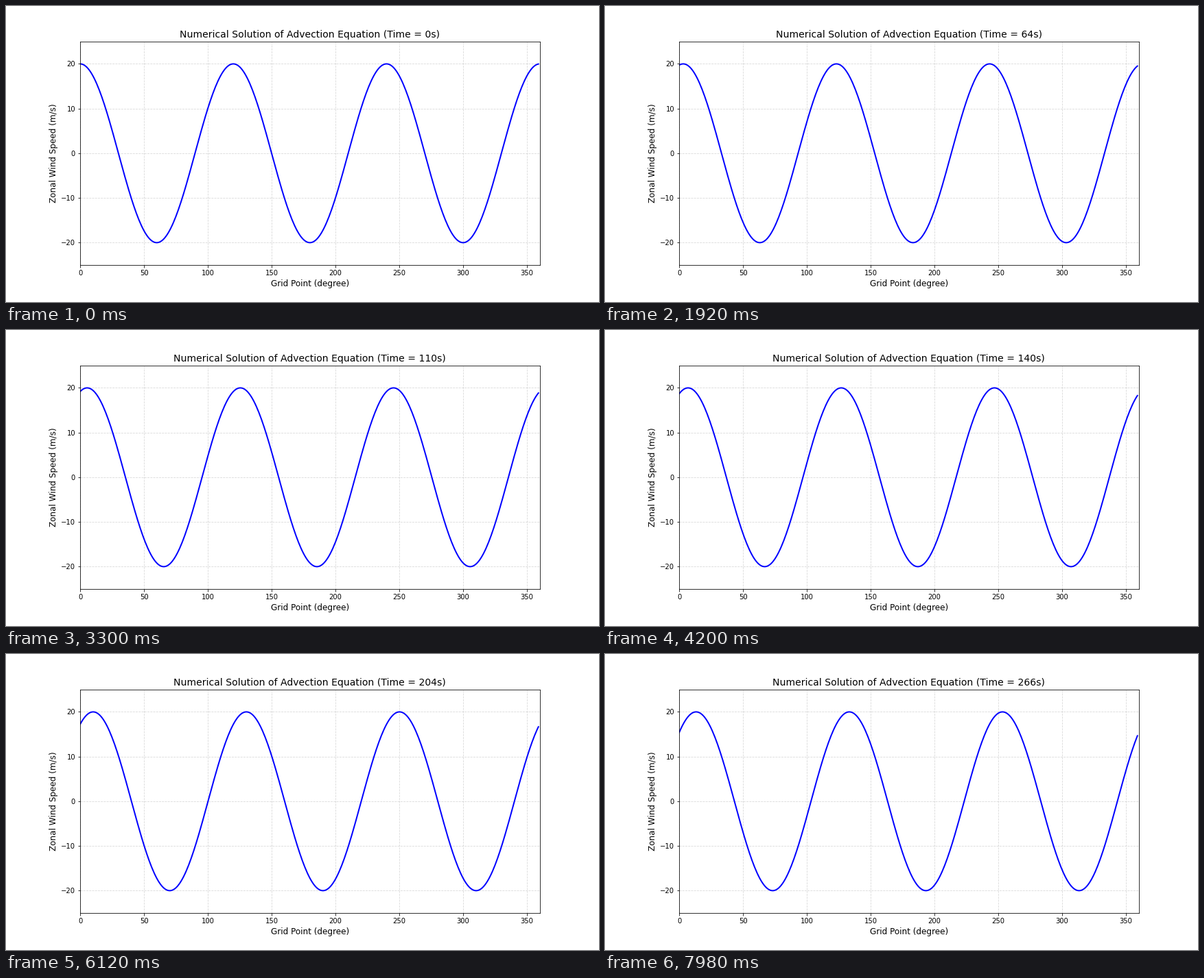
Animation of 864 by 432 pixels, one loop 8 s. Source, as a matplotlib script:

```python
import numpy as np
import matplotlib.pyplot as plt
from matplotlib.animation import FuncAnimation

LOOP_MS = 8000
TICK_MS = 20
TICKS_PER_STEP = 3    # the picture changes every 60 ms
DT = 2                # simulated seconds per step
SPEED = 0.05          # degrees per simulated second
AMPLITUDE = 20
WAVES = 3

grid = np.arange(360)


def wind(t):
    return AMPLITUDE * np.cos(np.radians(WAVES * (grid - SPEED * t)))


def title_text(t):
    return f"Numerical Solution of Advection Equation (Time = {t}s)"


plt.rcParams["font.family"] = "DejaVu Sans"
fig, ax = plt.subplots(figsize=(12, 6), dpi=72)
fig.subplots_adjust(left=0.125, right=0.9, bottom=0.125, top=0.88)
line, = ax.plot(grid, wind(0), color="blue", linewidth=2)
ax.set_xlim(0, 360)
ax.set_ylim(-25, 25)
ax.set_xticks(range(0, 351, 50))
ax.set_yticks(range(-20, 21, 10))
ax.set_xlabel("Grid Point (degree)", fontsize=12)
ax.set_ylabel("Zonal Wind Speed (m/s)", fontsize=12)
title = ax.set_title(title_text(0), fontsize=14)
ax.grid(True, linestyle="--", alpha=0.5)


def update(tick):
    t = tick // TICKS_PER_STEP * DT
    line.set_ydata(wind(t))
    title.set_text(title_text(t))
    return line, title


anim = FuncAnimation(fig, update, frames=LOOP_MS // TICK_MS, interval=TICK_MS,
                     init_func=lambda: update(0), repeat=True, repeat_delay=0)
plt.show()
```
